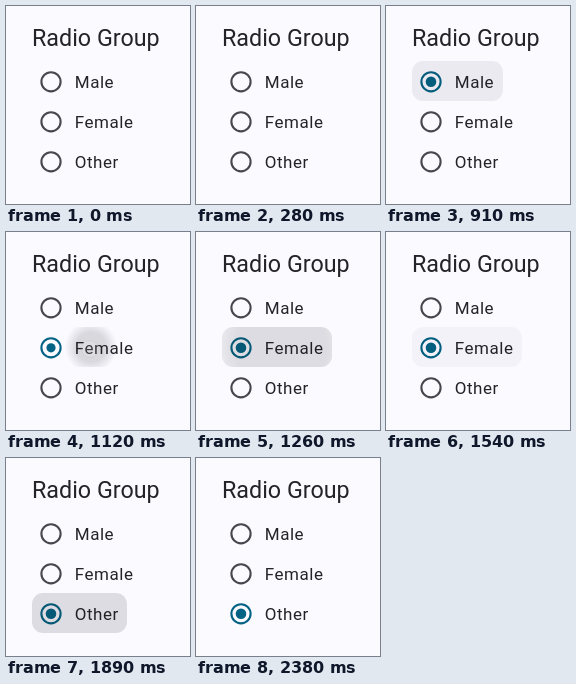
Animation of 184x198 px, one loop 2450 ms. Source, as an HTML page:

```html
<!DOCTYPE html>
<html lang="en">
<head>
<meta charset="utf-8">
<title>Radio Group</title>
<style>
  html, body { margin: 0; width: 100%; height: 100%; overflow: hidden; background: #fbfaff; }
  body { position: relative; font-family: Roboto, sans-serif; color: #242428; }

  h1 {
    position: absolute; left: 26px; top: 12px; margin: 0;
    font-size: 23.3px; font-weight: 400; line-height: 41px; white-space: nowrap;
  }

  .row { position: absolute; left: 25px; top: var(--y); width: var(--w); height: 41px; }
  .label {
    position: absolute; left: 43.8px; top: 1px;
    font-size: 17px; letter-spacing: .53px; line-height: 41px; white-space: nowrap;
  }
  svg { position: absolute; left: 0; top: 0; width: 40px; height: 41px; }

  .ring { fill: none; stroke: #48474d; stroke-width: 2.1; r: 9.6px; }
  .dot { fill: #046384; r: 0; }
  .ring, .dot, .state, .ripple, .tap {
    animation: 2450ms step-end var(--at) infinite;
  }
  .ring { animation-name: tint; }
  .dot { animation-name: pick; }
  .last .ring { animation-name: tint-last; }
  .last .dot { animation-name: pick-last; }

  /* Pressed-state layer, clipped to the rounded row */
  .state {
    position: absolute; left: .5px; top: 0; right: 0; height: 40px;
    border-radius: 11px; overflow: hidden; opacity: 0; animation-name: fade;
  }
  .ripple {
    position: absolute; left: calc(var(--x) - 110px); top: -90px;
    width: 220px; height: 220px; transform: scale(0);
    background: radial-gradient(closest-side, #1b1b1f 55%, #1b1b1f00);
    animation-name: grow; animation-delay: calc(var(--at) + var(--lag, 0ms));
  }
  .tap {
    position: absolute; left: calc(var(--x) - 9px); top: 13px;
    width: 18px; height: 18px; box-sizing: border-box; border-radius: 50%;
    border: 1px solid #8886; background: #fff6; opacity: 0;
    animation-name: tap;
  }

  /* One step is 70 ms, 1/35 of the loop */
  @keyframes pick {
    0% { r: 2.5px; } 2.857% { r: 4.6px; } 5.714% { r: 5.3px; }
    22.857% { r: 2.5px; } 25.714%, 100% { r: 0; }
  }
  @keyframes pick-last {
    0% { r: 2.5px; } 2.857% { r: 4.6px; } 5.714% { r: 5.3px; } 34.285%, 100% { r: 0; }
  }
  @keyframes tint {
    0% { stroke: #265565; } 2.857% { stroke: #046384; }
    22.857% { stroke: #265565; } 25.714%, 100% { stroke: #48474d; }
  }
  @keyframes tint-last {
    0% { stroke: #265565; } 2.857% { stroke: #046384; } 34.285%, 100% { stroke: #48474d; }
  }
  @keyframes fade {
    0% { opacity: 0; } 2.857% { opacity: .15; } 5.714% { opacity: .13; }
    14.285% { opacity: .1; } 17.142% { opacity: .067; }
    20% { opacity: .035; } 22.857%, 100% { opacity: 0; }
  }
  @keyframes grow {
    0% { transform: scale(0); } 2.857% { transform: scale(.24); }
    5.714% { transform: scale(.5); } 8.571% { transform: scale(.75); }
    11.428% { transform: scale(1); } 22.857%, 100% { transform: scale(0); }
  }
  @keyframes tap {
    0% { opacity: .8; } 2.857% { opacity: var(--tap, .3); } 5.714%, 100% { opacity: 0; }
  }
</style>
</head>
<body>
  <h1>Radio Group</h1>

  <div class="row" style="--y: 55px; --w: 91.5px; --at: 490ms; --x: 50px; --lag: 70ms; --tap: .8">
    <svg><circle class="ring" cx="20" cy="20.8"/><circle class="dot" cx="20" cy="20.8"/></svg>
    <span class="label">Male</span>
    <div class="state"><div class="ripple"></div></div>
    <div class="tap"></div>
  </div>

  <div class="row" style="--y: 95px; --w: 111px; --at: 1050ms; --x: 59px">
    <svg><circle class="ring" cx="20" cy="20.8"/><circle class="dot" cx="20" cy="20.8"/></svg>
    <span class="label">Female</span>
    <div class="state"><div class="ripple"></div></div>
    <div class="tap"></div>
  </div>

  <div class="row last" style="--y: 135px; --w: 96px; --at: 1610ms; --x: 57px">
    <svg><circle class="ring" cx="20" cy="20.8"/><circle class="dot" cx="20" cy="20.8"/></svg>
    <span class="label">Other</span>
    <div class="state"><div class="ripple"></div></div>
    <div class="tap"></div>
  </div>
</body>
</html>
```
